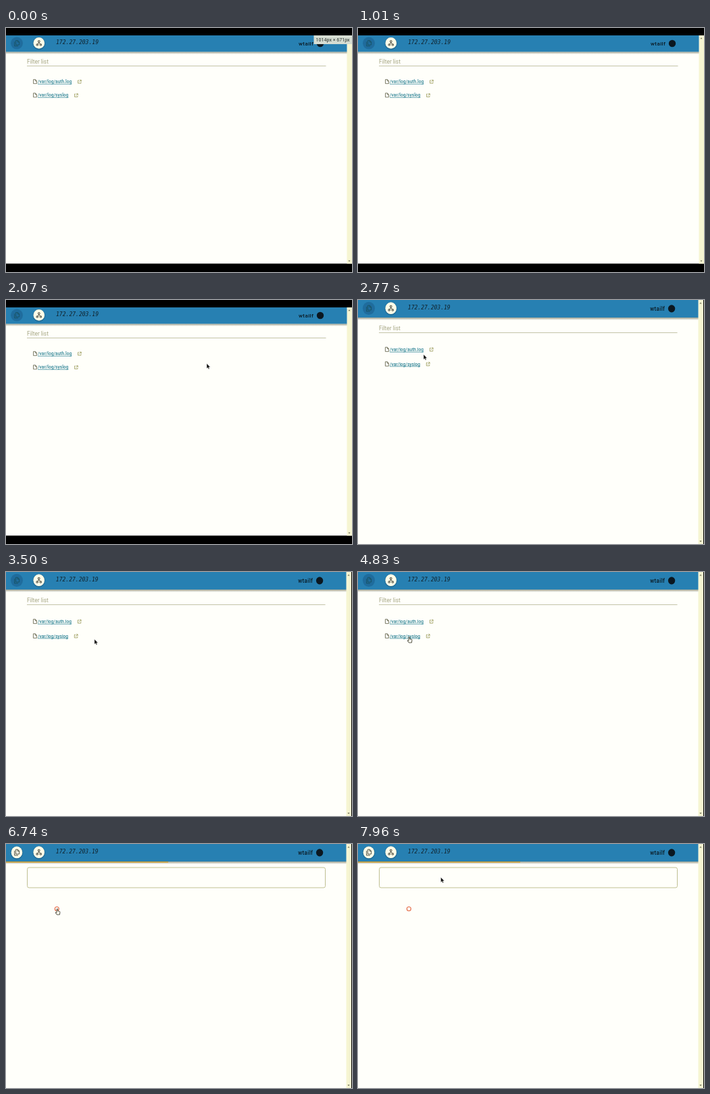
Write an HTML page that moves like this. It is 512 px wide and 363 px high and loops after 7.99 s.

```html
<!DOCTYPE html>
<html lang="en">
<head>
<meta charset="utf-8">
<title>Log list</title>
<style>
html, body { margin: 0; width: 100%; height: 100%; overflow: hidden; background: #000; }
svg { display: block; width: 100%; height: 100%; }
text { font-family: Roboto, sans-serif; }
.link { font-size: 6.6px; font-weight: 500; fill: #2f8496; text-decoration: underline; }
.line { fill: none; stroke-width: .8; }
</style>
</head>
<body>
<svg viewBox="0 0 512 363">
  <defs>
    <linearGradient id="shade" x2="0" y2="1">
      <stop stop-color="#66664c" stop-opacity=".65"/>
      <stop offset="1" stop-color="#66664c" stop-opacity="0"/>
    </linearGradient>
    <g id="file" class="line" stroke="#606048">
      <path d="M.5 .5H3.5L5.5 2.5V6.5H.5ZM3.3 .5V2.7H5.5"/>
    </g>
    <g id="open" class="line" stroke="#9a9a58">
      <path d="M2.2 .9H.5V5.2H5V3.5M3 .5H5.3V2.8M5.2 .6L2.3 3.5"/>
    </g>
    <path id="copy" class="line" d="M-1.5 -4H1.5L3.6 -1.9V2.4H-1.5ZM1.2 -4V-1.6H3.6M-3.4 -2.3V4.2H2"/>
  </defs>

  <g id="window">
    <rect y="11" width="512" height="339.5" fill="#fffffa"/>
    <rect x="504.5" y="11" width="7.5" height="339.5" fill="#f6f5d2"/>
    <path d="M506.4 16.2l1.6-2 1.6 2zM506.4 345.8l1.6 2 1.6-2z" fill="#77775c"/>
    <rect y="35.4" width="504.5" height="3.6" fill="url(#shade)"/>
    <rect y="11" width="504.5" height="24.4" fill="#2780b2"/>
    <rect id="bar" y="35.3" height="1.6" fill="#c9a03c"/>

    <g transform="translate(16 22.6)">
      <g id="dim">
        <circle r="9" fill="#1d6596" opacity=".75"/>
        <use href="#copy" stroke="#18505c"/>
      </g>
      <g id="lit">
        <circle cy=".6" r="9.2" fill="#174f70" opacity=".45"/>
        <circle r="8.3" fill="#fffde8"/>
        <use href="#copy" stroke="#33332a"/>
      </g>
    </g>
    <g transform="translate(48.8 22.4)">
      <circle cy=".6" r="9.2" fill="#174f70" opacity=".45"/>
      <circle r="8.3" fill="#fffde8"/>
      <path class="line" stroke="#33332a" d="M-1.2 -3.6H1.2V-1.2H-1.2ZM0 -1.2V.2M-2.4 1.5L0 0 2.4 1.5M-3.7 1.5H-1.4V3.6H-3.7ZM1.4 1.5H3.7V3.6H1.4Z"/>
    </g>
    <text x="74" y="24.1" font-size="8.05" font-style="italic" fill="#10202a" style="font-family:'DejaVu Sans Mono',monospace">172.27.203.19</text>
    <text x="433" y="26.2" font-size="8" font-weight="500" letter-spacing=".4" fill="#0b1a24">wtailf</text>
    <circle cx="465" cy="23" r="5.2" fill="#0b1720"/>

    <g id="list">
      <text x="31" y="53" font-size="8.4" fill="#a6a684">Filter list</text>
      <path d="M31 56.5H473.5" stroke="#b4b494" stroke-width=".8"/>
      <use href="#file" x="40" y="76.2"/>
      <text class="link" x="47" y="82">/var/log/auth.log</text>
      <use href="#open" x="106" y="77"/>
      <use href="#file" x="40" y="96.4"/>
      <text class="link" x="47" y="102.2">/var/log/syslog</text>
      <use href="#open" x="101" y="97.3"/>
    </g>
  </g>

  <rect id="log" x="31.5" y="35" width="441" height="30" rx="2.5" fill="none" stroke="#b9b987" stroke-width=".9"/>
  <g id="size">
    <rect x="455.5" y="11" width="56.5" height="13" fill="#d6ddd2"/>
    <text x="458.5" y="20.2" font-size="7.1" fill="#25302c">1014px × 671px</text>
  </g>
  <circle id="ring" cx="75.3" cy="96.5" r="3" fill="none" stroke="#e46a45" stroke-width="1.1"/>
  <path id="arrow" d="M0 0V7.4L1.7 5.9 2.8 8.4 4.1 7.8 3 5.4H5.3Z" fill="#111" stroke="#fffffa" stroke-width=".4"/>
  <path id="hand" d="M-.8 .4Q0 -.6 .8 .4V3.2L3.4 3.8Q4.2 4 4.1 5L3.6 8.6H-.6L-2.7 5.6Q-2.6 4.6 -.8 5.8Z" fill="#fffef0" stroke="#2b2b20" stroke-width=".8"/>
</svg>
<script>
const LOOP = 7990;
// pointer stops: time, x, y
const path = [
  [1600, 508, 190], [2000, 297, 94.5], [2120, 297, 94.5], [2700, 97, 81], [2900, 97, 81],
  [3450, 131, 100], [3650, 130, 100], [4250, 75.8, 96.5], [6880, 75.8, 96.5],
  [7600, 117, 67], [7900, 122.5, 49.5], [LOOP, 122.5, 49.5]
];
const el = id => document.getElementById(id);
const show = (id, on) => el(id).style.display = on ? "" : "none";
const ease = p => p * p * (3 - 2 * p);

function pointer(t) {
  const i = Math.max(1, path.findIndex(p => p[0] > t));
  const [a, x, y] = path[i - 1], [b, x2, y2] = path[i];
  const k = ease(Math.max(0, (t - a) / (b - a)));
  return [x + (x2 - x) * k, y + (y2 - y) * k];
}

function draw(now) {
  const t = now % LOOP;
  const log = t >= 6060, hand = t >= 4130 && t < 6960;
  el("window").setAttribute("transform",
    t < 2400 ? "" : "scale(.998 1.0693) translate(0 -11)");
  show("size", t < 370);
  show("list", !log);
  show("log", log);
  show("dim", !log);
  show("lit", log);
  show("ring", t >= 5500);
  el("bar").setAttribute("width", 240.5 * ease(Math.min(1, Math.max(0, (t - 5600) / 300))));
  show("hand", hand);
  show("arrow", t >= 1600 && !hand);
  el(hand ? "hand" : "arrow").setAttribute("transform", `translate(${pointer(t)})`);
  requestAnimationFrame(draw);
}
draw(0);
</script>
</body>
</html>
```
